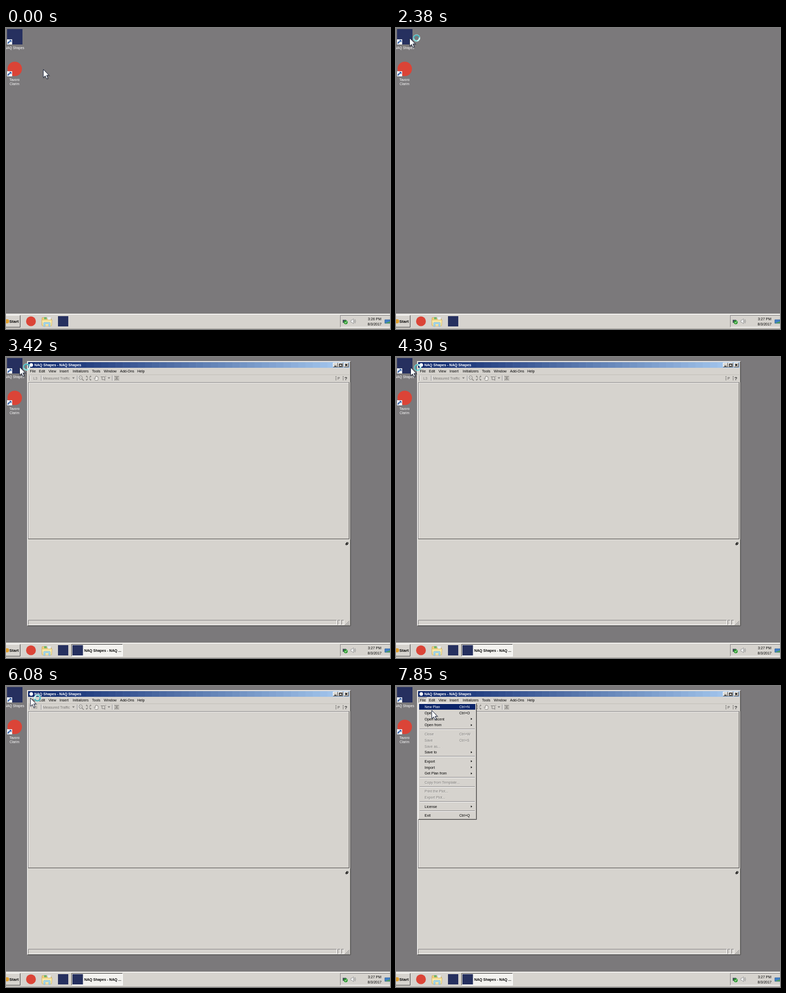
Animation of 746 by 585 pixels, one loop 8 s. Source, as an HTML page:

```html
<!DOCTYPE html>
<html lang="en">
<head>
<meta charset="utf-8">
<title>Desktop</title>
<style>
html, body { margin: 0; width: 100%; height: 100%; overflow: hidden; background: #7b797b; }
svg { display: block; }
text { font: 7px "Liberation Sans", Arial, sans-serif; white-space: pre; }
.bold { font-weight: bold; }
.label { font-size: 6.5px; fill: #fff; text-anchor: middle; }
.off { fill: #7b7976; }
</style>
</head>
<body>
<script>
const APP = 'NAQ Shapes', FACE = '#d6d3ce', DARK = '#848284', NAVY = '#0a246a', LOGO = '#26305f';

const rect = (x, y, w, h, fill, extra = '') =>
  `<rect x="${x}" y="${y}" width="${w}" height="${h}" fill="${fill}" ${extra}/>`;
const path = (d, stroke, width = 1, fill = 'none') =>
  `<path d="${d}" stroke="${stroke}" stroke-width="${width}" fill="${fill}"/>`;
const disc = (x, y, r, fill) => `<circle cx="${x}" cy="${y}" r="${r}" fill="${fill}"/>`;
const text = (x, y, s, cls = '', extra = '') => `<text x="${x}" y="${y}" class="${cls}" ${extra}>${s}</text>`;
const group = (id, body, extra = '') => `<g id="${id}" ${extra}>${body}</g>`;

function bevel(x, y, w, h, light, shade, fill = FACE) {
  return rect(x, y, w, h, fill) +
    path(`M${x + .5} ${y + h - .5}V${y + .5}H${x + w - .5}`, light) +
    path(`M${x + .5} ${y + h - .5}H${x + w - .5}V${y + .5}`, shade);
}
const raised = (x, y, w, h) => bevel(x, y, w, h, '#fff', '#424142');
const sunken = (x, y, w, h, fill) => bevel(x, y, w, h, DARK, '#fff', fill);
const thickFrame = (x, y, w, h) => raised(x, y, w, h) +
  path(`M${x + 1} ${y + h - 1.5}H${x + w - 1.5}V${y + 1}`, '#a09e9a');
const greyText = (x, y, s) => text(x + .7, y + .7, s, '', 'fill="#fff" opacity=".7"') + text(x, y, s, 'off');
const separator = (x, y1, y2) => path(`M${x}.5 ${y1}V${y2}`, DARK) + path(`M${x + 1}.5 ${y1}V${y2}`, '#fff');

function shortcutBadge(x, y) {
  return rect(x, y, 10, 10, '#f4f7fb') +
    path(`M${x + 2} ${y + 8.5}Q${x + 2} ${y + 5} ${x + 6} ${y + 4.5}`, '#1d4f9c', 2) +
    path(`M${x + 4} ${y + 1.5}H${x + 8.5}V${y + 6}Z`, 'none', 0, '#1d4f9c');
}

function desktop() {
  return rect(2, 2, 30, 30, LOGO) + shortcutBadge(2, 22) +
    group('selected', rect(2, 2, 30, 30, NAVY, 'opacity=".5"') + rect(0, 34, 36, 9, NAVY)) +
    text(16.5, 41, APP, 'label') +
    disc(17, 79.5, 14, '#db4437') + shortcutBadge(2, 84) +
    text(16.5, 103, 'Tavoro', 'label') + text(16.5, 111, 'Clarim', 'label');
}

function folder() {
  return path('M70 563h7l2 2h9v13h-18z', '#c9a24a', .8, '#f2d27c') +
    rect(74, 562, 5, 4, '#6fb56a') + rect(81, 562, 6, 5, '#e9eef2') +
    path('M69.5 567.5h20l-1 11.500h-18z', '#d3b35f', .8, '#fbe9a6') +
    path('M73 580v-6q0-2 2-2h9q2 0 2 2v6h-3v-5h-7v5z', '#6aaed0', .6, '#a5d8ee');
}

function tray() {
  return sunken(649, 558, 98, 24) +
    rect(654, 567, 7, 6, '#5d6670') + rect(655, 568, 5, 4, '#3d4a56') +
    disc(660, 572, 3.8, '#2c9c2f') + path('M658 572l1.500 1.600 2.500-3.400', '#fff', 1) +
    path('M670 568h2l3-3v10l-3-3h-2z', '#77797b', .7, '#f5f5f5') +
    path('M676.500 567.500q1.500 2.500 0 5M678 566q2.500 4 0 8', '#8a8c8e', .8) +
    text(729, 567.5, '', '', 'id="clock" text-anchor="end"') +
    text(702.5, 577.5, '8/3/2017') +
    path('M736 567h10v7h-10z', '#2a5c9e', .8, '#3f7fc4') + path('M736 574l10-4v4z', 'none', 0, '#4f9c5a');
}

function taskbar() {
  return rect(0, 555, 746, 30, FACE) + rect(0, 556, 746, 1, '#fff') + rect(0, 584, 746, 1, '#a5a29c') +
    raised(-3, 558, 31, 24) + disc(2, 570, 4, '#e0a030') +
    text(6.5, 572.7, 'Start', 'bold', 'style="font-size:8px"') +
    disc(48.5, 570, 9.5, '#db4437') + folder() + rect(101, 560, 20, 20, LOGO) + tray();
}

function titleBar() {
  const bands = 44, width = 624 / bands, from = [10, 36, 106], to = [166, 202, 240];
  let out = '';
  for (let i = 0; i < bands; i++) {
    const c = from.map((v, k) => Math.round(v + (to[k] - v) * i / (bands - 1)));
    out += rect(43 + i * width, 10, width + .5, 11, `rgb(${c})`);
  }
  out += disc(49, 15.5, 3.5, '#fff') + text(55, 18, `${APP} - ${APP}`, 'bold', 'fill="#fff"');
  for (const x of [635, 645, 656]) out += raised(x, 11, 10, 9);
  return out + rect(638, 17, 4, 1.3, '#000') +
    path('M647.500 13.500h5v4.500h-5zM647.500 14h5', '#000') + path('M659 13.500l4 4M663 13.500l-4 4', '#000', 1.2);
}

function toolbar() {
  const grey = '#7d7b78';
  let out = separator(45, 36, 46) + separator(68, 36, 46) + separator(138, 36, 46) + separator(206, 36, 46) +
    text(53, 43.5, 'L3', 'off') + text(72, 43.5, 'Measured Traffic', 'off') +
    path('M128.500 39.500h5l-2.500 3z', 'none', 0, grey) + path('M197.500 39.500h5l-2.500 3z', 'none', 0, grey) +
    `<circle cx="145" cy="40" r="3.3" fill="#eceae6" stroke="${grey}"/>` + path('M147.500 42.500l3.500 3.500M143.500 40h3', grey, 1.2) +
    path('M156 37l3 3M165 37l-3 3M156 45l3-3M165 45l-3-3', grey, 1.1) +
    path('M156 39v-2h2M163 37h2v2M156 43v2h2M163 45h2v-2', grey, .8) +
    path('M173.500 45.500l-2.500-4 1-.7 1.500 1.500v-4h1.300v-1.300h1.500v1h1.500v1h1.300v4l-1 2.500z', grey, .8, '#f1efec') +
    path('M186.500 38.500h5.500v5.500h-5.500zM184 38.500h2.500M192 44v2M193 37.500h1.500', grey, 1) +
    path('M210 37.500h10M210 41h10M210 44.500h10', grey, .9) +
    path('M211 37l8 8M219 37l-8 8M215 37v8', grey, .9);
  for (const x of [640, 654]) for (const y of [37.5, 40.5, 43.5]) out += rect(x, y, 2, 1.5, grey);
  return out + text(644, 43.5, 'P', 'bold off') + text(657.5, 44.5, '?', 'bold', 'fill="#333" style="font-size:9px"');
}

function mainPanel() {
  return path('M43.500 353.500V49.500H666.500', DARK) + path('M44.500 353V50.500H666', '#f3f1ee') +
    path('M43 353.700H666.700V49', '#5b5957', 1.4) + path('M43 355H668V49', '#eceae6');
}

function appWindow() {
  const menus = [['File', 46.5], ['Edit', 64], ['View', 82.5], ['Insert', 104], ['Initializers', 129.5],
    ['Tools', 167], ['Window', 190], ['Add-Ons', 221.5], ['Help', 255]];
  return thickFrame(41, 8, 629, 515) + titleBar() +
    group('pressed', sunken(44, 22, 17, 11)) +
    menus.map(([name, x]) => text(x, 29.8, name)).join('') +
    path('M43 34.500H667', '#c2bfb9') + toolbar() + mainPanel() +
    path('M661.500 360.500h3v3h-3zM660 362.500h3v2.500h-3z', '#000', 1, FACE) +
    sunken(43, 511, 600, 10) + sunken(644, 511, 6, 10) + sunken(651, 511, 6, 10) +
    path('M659 521l8-8M662 521l5-5M665 521l2-2', DARK) +
    bevel(127, 558, 100, 24, '#424142', '#fff', '#f3f2ef') + rect(129, 560, 20.5, 20, LOGO) +
    text(152, 572.5, `${APP} - ${APP.slice(0, 3)} ...`, 'bold');
}

// A leading "-" disables an item, a trailing ">" opens a submenu and "|" splits off the shortcut.
function fileMenu() {
  const sections = [['New Plan|Ctrl+N', 'Open...|Ctrl+O', 'Open recent>', 'Open from>'],
    ['-Close|Ctrl+W', '-Save|Ctrl+S', '-Save as...', 'Save to>'],
    ['Export>', 'Import>', 'Get Plan from>'], ['-Copy from Template...'],
    ['-Print the Plot...', '-Export Plot...'], ['License>'], ['Exit|Ctrl+Q']];
  let y = 40.5, out = thickFrame(43, 33, 114, 227) + group('highlight', rect(45, 35, 109, 11, NAVY));
  sections.forEach((items, i) => {
    if (i) {
      const line = Math.round(y - 4.5) + .5;
      out += path(`M46 ${line}H153`, DARK) + path(`M46 ${line + 1}H153`, '#fff');
      y += 5.7;
    }
    for (const item of items) {
      const [name, keys = ''] = item.replace(/^-|>$/g, '').split('|');
      const write = item[0] === '-' ? greyText : text;
      const row = write(55.5, y + 2.5, name) + write(123, y + 2.5, keys);
      out += name === 'New Plan' ? group('newPlan', row) : row;
      if (item.endsWith('>')) out += path(`M145.500 ${y - 2}v4l2.500-2z`, 'none', 0, '#000');
      y += 11.8;
    }
  });
  return out;
}

function pointer() {
  const arrow = 'M.5.5V16.200L4.200 12.900L6.800 18.600L9.300 17.500L6.800 11.900H11.500Z';
  return `<g transform="translate(1 1)" opacity=".22">${path(arrow, '#000', 1.5, '#000')}</g>` +
    path(arrow, '#1d2740', 1, '#fff') +
    group('ring', `<circle r="5.500" fill="none" stroke="#3fb3ba" stroke-width="2.600"/>` +
      `<circle r="6.800" fill="none" stroke="#d4f1f1" stroke-width=".6"/>` +
      `<g id="spin">${path('M0-5.500A5.500 5.500 0 0 1 5.500 0', '#d9fbf8', 2.4)}` +
      `${path('M5.500 0A5.500 5.500 0 0 1 0 5.500', '#86dcd9', 2.4)}</g>`, 'transform="translate(14 .5)"');
}

document.body.innerHTML = `<svg width="746" height="585" viewBox="0 0 746 585">${rect(0, 0, 746, 585, '#7b797b')}` +
  desktop() + taskbar() + group('app', appWindow()) + group('menu', fileMenu()) + group('pointer', pointer()) + '</svg>';

const STEP = 148.1, LOOP = 8000;
// Pointer stops: step, x, y.
const route = [[0, 72, 80], [1, 70, 77], [6, 30, 26], [8, 26, 19], [25, 26, 19], [29, 28, 19.5], [31, 44, 18],
  [33, 35, 19], [35, 48, 20], [36, 47, 21], [39, 47, 22], [42, 47, 24], [46, 47, 26.5], [50, 47, 26.5], [51, 52, 31], [53, 69, 47]];
const el = id => document.getElementById(id);
const show = (id, on) => el(id).setAttribute('visibility', on ? 'visible' : 'hidden');

function pointerAt(n) {
  const i = route.findIndex(p => p[0] >= n);
  if (i < 0) return route[route.length - 1].slice(1);
  if (i === 0) return route[0].slice(1);
  const [a, b] = [route[i - 1], route[i]], k = (n - a[0]) / (b[0] - a[0]);
  return [1, 2].map(j => a[j] + (b[j] - a[j]) * k);
}

function draw(t) {
  const n = Math.floor(t / STEP);
  const hover = n >= 52;
  show('selected', n >= 6 && n < 14);
  show('app', n >= 17);
  show('pressed', n >= 47);
  show('menu', n >= 47);
  show('highlight', hover);
  show('ring', n >= 11 && n < 48);
  el('newPlan').setAttribute('fill', hover ? '#fff' : '#000');
  el('clock').textContent = n >= 12 ? '3:27 PM' : '3:26 PM';
  el('pointer').setAttribute('transform', `translate(${pointerAt(n).map(Math.round)})`);
  el('spin').setAttribute('transform', `rotate(${n * 50 % 360})`);
}

const start = performance.now();
function tick() {
  draw((performance.now() - start) % LOOP);
  requestAnimationFrame(tick);
}
draw(0);
requestAnimationFrame(tick);
</script>
</body>
</html>
```
